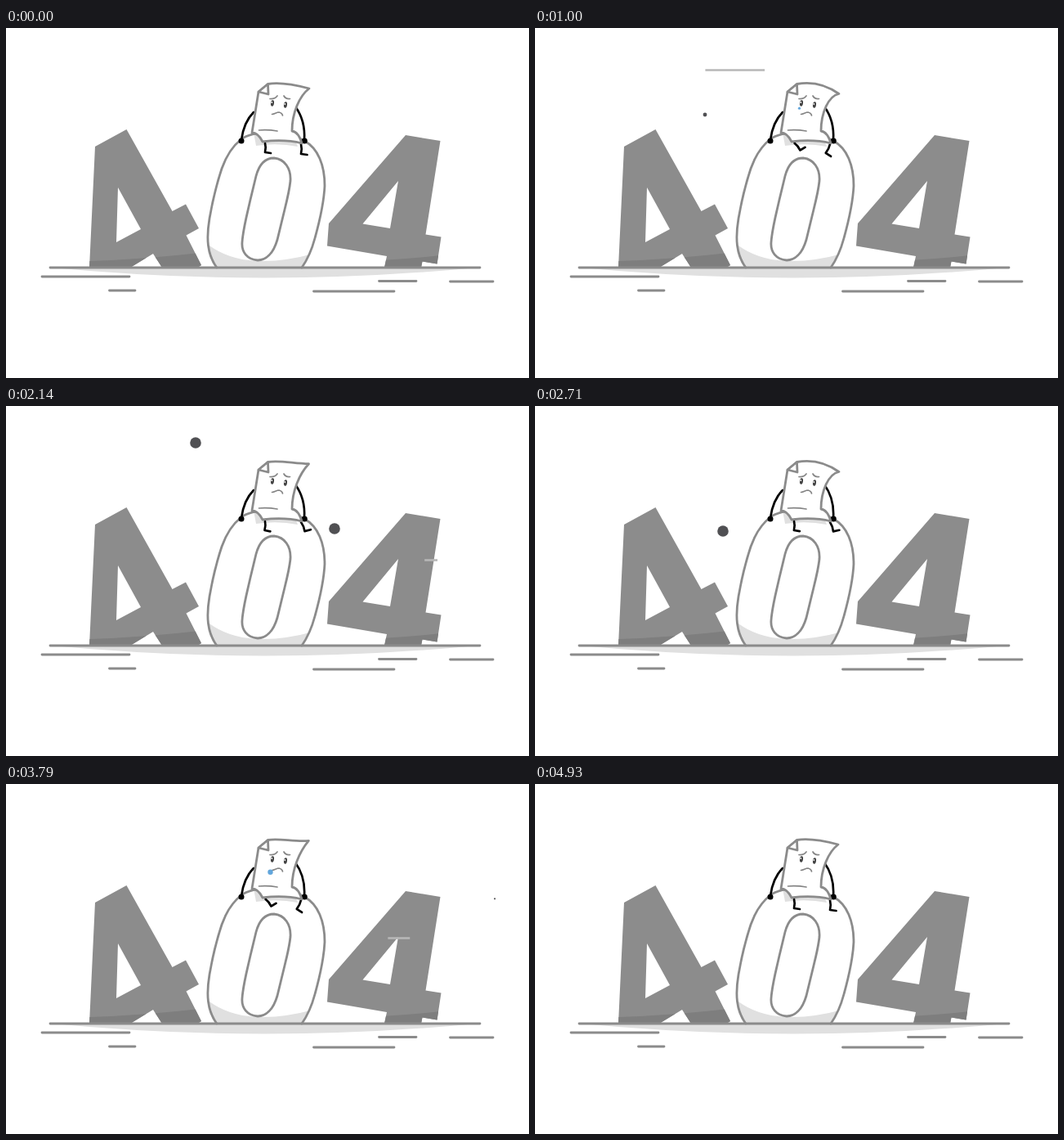
Animation, 640 px wide and 428 px high, one loop 5000 ms. Source, as an HTML page:

```html
<!DOCTYPE html>
<html lang="en">
<head>
<meta charset="utf-8">
<title>404</title>
<style>
  html, body { margin: 0; width: 100%; height: 100%; overflow: hidden; background: #fff; }
  svg { display: block; width: 100%; height: 100%; }
  path, line { stroke-linecap: round; stroke-linejoin: round; }
  .ink { fill: none; stroke: #8b8b8b; stroke-width: 2.8; }
  .sheet { fill: #fff; stroke: #8b8b8b; stroke-width: 2.8; }
  .thin { fill: none; stroke: #858585; stroke-width: 1.7; }
  .limb { fill: none; stroke: #000; stroke-width: 2.7; }
  .digit { fill: #8c8c8c; }
  .dark { fill: #7e7e7e; }
  .shade { fill: #e0e0e0; }
  .wind { stroke: #b7b7b7; stroke-width: 2.6; stroke-linecap: butt; }
  .dot { fill: #505053; }
  .tear { fill: #62a6dc; }
</style>
</head>
<body>
<svg viewBox="0 0 640 428">
  <defs>
    <path id="left" d="M109 145L147.500 124L203.500 224L220 215.500L236 245L220.500 253.500L239 290L234 293H191L165 246L135 262L137 195L165 246L191 293L180 276L152 293H102Z" fill-rule="evenodd"/>
    <path id="right" d="M489 131L531.500 138L513.500 252.500L532.500 255.500L527.500 288.500L509.500 285.500L508 293H463L466 279L393 266.500L395 239ZM480 187L436.500 239.500L470 245Z" fill-rule="evenodd"/>
    <path id="zero" d="M258 293C246 277 245 257 249 233C253 210 258 190 264 172C270 155 279 143 288 136C300 127 340 122 365 138C382 147 390 168 390 193C389 214 383 239 378 257C374 272 369 283 362 293"/>
    <clipPath id="inLeft"><use href="#left"/></clipPath>
    <clipPath id="inRight"><use href="#right"/></clipPath>
    <clipPath id="inZero"><use href="#zero"/></clipPath>
  </defs>

  <path class="shade" d="M56 293Q317 318 577 293Z"/>
  <use href="#left" class="digit"/>
  <path class="dark" clip-path="url(#inLeft)" d="M100 285Q170 283 245 274V294H100Z"/>
  <use href="#right" class="digit"/>
  <path class="dark" clip-path="url(#inRight)" d="M460 284Q500 282 540 277V294H460Z"/>

  <use href="#zero" fill="#fff"/>
  <g clip-path="url(#inZero)">
    <path class="shade" d="M245 263Q290 300 380 275V294H245Z"/>
    <path class="shade" d="M303 128L306 144Q332 140 357 145L350 128Z"/>
  </g>
  <use href="#zero" class="ink"/>
  <path class="sheet" d="M289 262C290 246 295 228 299 210L306 181C310 166 318 159 328 159C341 160 349 172 348 187C347 197 344 210 341 222L332 259C327 276 318 284 308 284C295 283 288 274 289 262Z"/>

  <path class="ink" d="M54 293H580M44 304H151M126.500 321H158M376.500 322H475M456.500 309.500H502M543.500 310H596"/>

  <path class="limb" d="M303 103C295 111 290 122 288 137M354 96C362 107 366 122 365 137"/>
  <circle cx="288" cy="138" r="3.500"/>
  <circle cx="365.300" cy="138" r="3.500"/>
  <path id="legA" class="limb" d="M317 141Q318.500 146 317 152L324 153"/>
  <path id="legB" class="limb" d="M361 142Q362.500 148 361 154L368.500 155"/>
  <path id="sheet" class="sheet"/>
  <path class="sheet" d="M309 78L320.500 68.500L321 81Z"/>
  <path class="thin" d="M309.500 125Q320 124 332 126M323 86.500Q329 87 332 83M340 83Q342 87 347.500 86.500M325.500 105.500C329 105 331 103 334 103Q338 104 338.500 107"/>
  <g fill="#444">
    <ellipse cx="326" cy="92" rx="2" ry="3.700" transform="rotate(8 326 92)"/>
    <ellipse cx="342" cy="94" rx="2" ry="3.700" transform="rotate(8 342 94)"/>
  </g>
  <circle cx="325.300" cy="91" r=".9" fill="#fff"/>
  <circle cx="341.300" cy="93" r=".9" fill="#fff"/>

  <circle id="tear" class="tear" cx="323.500"/>
  <line id="windA" class="wind" y1="51.500" y2="51.500"/>
  <line id="windB" class="wind" y1="188.500" y2="188.500"/>
  <circle id="dotA" class="dot"/>
  <circle id="dotB" class="dot"/>
</svg>
<script>
const LOOP = 5000, STEP = 1000 / 14;
const $ = id => document.getElementById(id);
const set = (id, attrs) => {
  for (const name in attrs) $(id).setAttribute(name, attrs[name]);
};

const clamp = u => Math.min(1, Math.max(0, u));
const easeOut = u => 1 - (1 - u) ** 2;
const easeInOut = u => u < .5 ? 2 * u * u : 1 - 2 * (1 - u) ** 2;
const wave = (t, peak, period) => Math.cos((t - peak) / period * 2 * Math.PI);
// Rises from 0 to 1 and falls back, as u runs from 0 to 1.
const swell = (u, rise, fall) => clamp(Math.min(u / rise, (1 - u) / fall));

// Smooth curve through evenly timed points, u from 0 to 1.
function spline(points, u) {
  const last = points.length - 1, s = clamp(u) * last;
  const i = Math.min(last - 1, Math.floor(s)), f = s - i;
  const p = n => points[Math.min(last, Math.max(0, n))];
  return [0, 1].map(c => {
    const a = p(i - 1)[c], b = p(i)[c], d = p(i + 1)[c], e = p(i + 2)[c];
    return b + f / 2 * (d - a + f * (2 * a - 5 * b + 4 * d - e + f * (3 * (b - d) + e - a)));
  });
}

const pathA = [[62, 240], [208, 106], [202, 198], [402, 150], [572, 120]];
const pathB = [[122, 110], [232, 45], [230, 153], [430, 205], [612, 134]];

function drawDot(id, path, start, rise, t) {
  const u = (t - start * STEP) / (32 * STEP);
  const [cx, cy] = spline(path, u);
  set(id, { cx, cy, r: 6.8 * swell(u, rise, .2) });
}

function drawWind(id, from, to, ease, s) {
  const x = u => from + (to - from) * ease(clamp(u));
  const tail = x((s - 92) / 790), head = x(s / 860);
  set(id, { x1: tail, x2: Math.max(tail, head) });
}

function drawTear(s) {
  set("tear", { cy: 93.5 + s / 30, r: 3.2 * swell(s / 930, .3, .2) });
}

function drawSheet(sway) {
  const x = 371 + sway / 7, y = 74 + sway;
  set("sheet", { d: `M309 78L320.500 68.500C334 66 352 ${69 - sway * .4} ${x} ${y}`
    + "C359 83 350 104 350 126C357 127 360 134 362 141"
    + "C346 137 330 137 314 139C311 133 307 128 301 128Z" });
}

function draw(t) {
  const moving = swell((t - 210) / 4720, .1, .1);
  const swing = wave(t, 1000, 39 * STEP);
  set("legA", { transform: `rotate(${moving * (-16 - 22 * swing)} 317 140)` });
  set("legB", { transform: `rotate(${moving * 26 * swing} 361 142)` });
  drawSheet(moving * 6.5 * wave(t, 1000, 24 * STEP));
  drawTear((t < 3000 ? t : t - 2500) - 860);
  drawWind("windA", 131, 559, easeOut, t - 833);
  drawWind("windB", 78, 556, easeInOut, (t < 2600 ? t : t - 24 * STEP) - 1430);
  drawDot("dotA", pathA, 6, .7, t);
  drawDot("dotB", pathB, 22, .2, t);
}

const start = performance.now();
function tick() {
  const t = (performance.now() - start) % LOOP;
  draw(Math.floor((t + 6) / STEP) * STEP % LOOP);
  requestAnimationFrame(tick);
}
tick();
</script>
</body>
</html>
```
